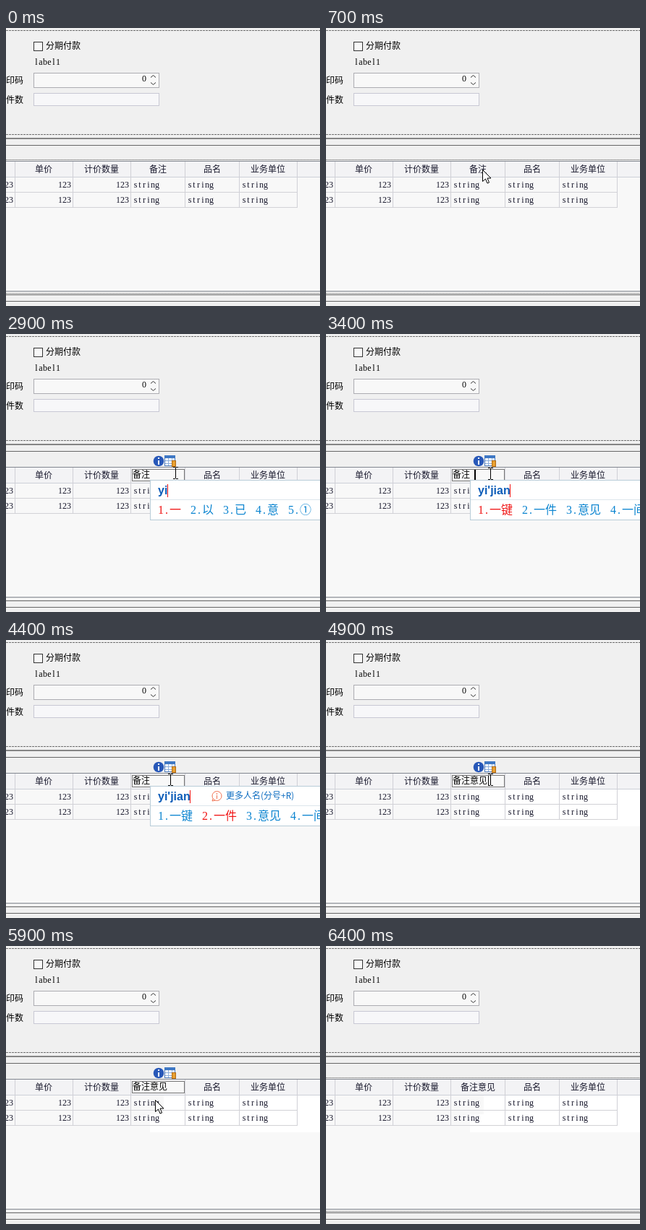
An HTML page with a canvas for the animation above (7100 ms loop, 434 by 385 pixels).

```html
<!DOCTYPE html>
<html lang="zh">
<head>
<meta charset="utf-8">
<style>
html, body { margin: 0; width: 100%; height: 100%; overflow: hidden; background: #f0f0f0; }
canvas { display: block; }
</style>
</head>
<body>
<canvas id="stage" width="434" height="385"></canvas>
<script>
const g = document.getElementById('stage').getContext('2d');
const LOOP = 7100;
const CJK = '"Noto Sans CJK SC", "Noto Sans CJK", sans-serif';
const HAN = '12px ' + CJK;
const INK = '#18182c', BLUE = '#0a84d0', RED = '#f01414', EDGE = '#828790';

// Rows are [start, ...values]; returns the row in force at t.
const at = (rows, t) => rows.filter(r => r[0] <= t).pop();
const within = (t, a, b) => t >= a && t < b;

function box(x, y, w, h, fill, stroke) {
  g.fillStyle = fill;
  g.fillRect(x, y, w, h);
  if (stroke) {
    g.strokeStyle = stroke;
    g.lineWidth = 1;
    g.strokeRect(x + .5, y + .5, w - 1, h - 1);
  }
}

function text(s, x, y, font = HAN, color = INK, align = 'left') {
  g.font = font;
  g.fillStyle = color;
  g.textAlign = align;
  g.fillText(s, x, y);
}

// Half-width Latin: every character sits in a cell half an em wide.
function latin(s, x, y, color = INK, size = 12) {
  const font = size + 'px "Liberation Serif", serif';
  [...s].forEach((c, i) => text(c, x + (i + .5) * size / 2, y, font, color, 'center'));
}

function dots(y, color, on = 1, off = 1) {
  g.fillStyle = color;
  for (let x = 0; x < 434; x += on + off) g.fillRect(x, y, on, 1);
}

function line(points, color, width = 1) {
  g.beginPath();
  points.forEach(([x, y]) => g.lineTo(x, y));
  g.strokeStyle = color;
  g.lineWidth = width;
  g.stroke();
}

function form() {
  box(0, 0, 434, 385, '#f0f0f0');
  dots(3, '#707070', 3, 1);
  box(38, 19, 13, 13, '#f8f8f8', '#333');
  text('分期付款', 55, 29, HAN, '#000');
  latin('label1', 39, 51, '#000');
  text('印码', 0, 77, HAN, '#000');
  text('件数', 0, 104, HAN, '#000');
  box(38, 62, 174, 21, '#f8f8f8', '#adadb2');
  latin('0', 188, 74, '#000');
  line([[200, 68.5], [203.5, 65.5], [207, 68.5]], '#333');
  line([[200, 75.5], [203.5, 78.5], [207, 75.5]], '#333');
  box(38, 90, 174, 18, '#f7f7f9', '#c8c8d4');
  dots(147, '#707070', 3, 1);
  box(0, 152, 434, 2, '#858585');
  box(0, 162, 434, 1, '#666');
}

function table(t) {
  box(0, 185, 434, 179, '#f8f8f8');
  box(0, 185, 434, 22, '#f3f3f5');
  box(0, 184, 434, 1, EDGE);
  if (t >= 4800) {
    box(199, 207, 235, 51, '#fff');
    if (t >= 5900) box(199, 207, 19, 26, '#f8f8f8');
  }
  box(0, 206, 434, 1, '#cdd0d8');
  for (const y of [227, 248]) box(0, y, 403, 1, '#d2d2d6');
  for (const x of [12, 92, 172, 247, 322, 402]) box(x, 185, 1, 64, '#d0d0d6');
  [['单价', 52], ['计价数量', 132], ['品名', 285], ['业务单位', 362]]
    .forEach(([s, x]) => text(s, x, 200, HAN, INK, 'center'));
  if (!within(t, 1400, 6200)) text(t < 1400 ? '备注' : '备注意见', 210, 200, HAN, INK, 'center');
  for (const y of [221, 242]) {
    for (const x of [-8, 72, 152]) latin('123', x, y);
    for (const x of [176, 251, 326]) latin('string', x, y);
  }
  box(0, 364, 434, 1, EDGE);
  box(0, 369, 434, 1, '#666');
  box(0, 378, 434, 1, '#666');
  if (!within(t, 1100, 6400)) {
    dots(182, '#555');
    dots(367, '#555');
  }
}

function icons() {
  g.fillStyle = '#2858b8';
  g.beginPath();
  g.arc(211, 176, 7.3, 0, 7);
  g.fill();
  box(210, 171, 2, 2, '#fff');
  box(210, 175, 2, 6, '#fff');
  box(219, 168, 15, 15, '#fff', '#4a78b8');
  box(219, 168, 15, 4, '#3f78c4');
  for (const y of [175, 179]) box(220, y, 13, 1, '#8fb0dc');
  for (const x of [224, 229]) box(x, 172, 1, 10, '#8fb0dc');
  box(229, 175, 6, 9, '#e8a030', '#b06a18');
}

function editor(t) {
  box(174, 187, 73, 17, '#f8f8f8', '#777');
  const selected = t < 1800;
  if (selected) box(175, 188, 25, 12, '#0078d7');
  text(t < 4800 ? '备注' : '备注意见', 175, 199, HAN, selected ? '#fff' : '#000');
  if (within(t, 1800, 2200)) box(199, 188, 1, 12, '#000');
  if (within(t, 3200, 3900) || within(t, 4500, 4800)) box(205, 188, 2, 14, '#000');
  if (within(t, 4800, 5700)) box(224, 188, 1, 14, '#000');
}

const typing = [
  [2900, 'yi', '一 以 已 意 ①'],
  [3100, "yi'j", '一家 一进 一句 一间'],
  [3200, "yi'ji", '一级 以及 一季 一集'],
  [3300, "yi'jia", '一家 一加 一价 以家'],
  [3400, "yi'jian", '一键 一件 意见 一间']
];

function popup(t) {
  const [, typed, words] = at(typing, t);
  const pick = t < 3900 ? 0 : t < 4500 ? 1 : 2;
  box(199, 202, 240, 56, '#fff', '#b8ccd8');
  box(200, 229, 234, 1, '#dde6ec');
  text(typed, 210, 222, 'bold 16px "Liberation Sans", sans-serif', '#0c5cb8');
  box(Math.floor(210 + g.measureText(typed).width), 208, 1, 18, RED);

  let x = 210;
  words.split(' ').forEach((word, i) => {
    const color = i === pick ? RED : BLUE;
    latin(i + 1 + '.', x, 249, color, 16);
    text(word, x + 16, 249, '16px ' + CJK, color);
    x += 29 + 16 * word.length;
  });

  if (t >= 4000) {
    g.globalAlpha = Math.min(1, (Math.floor(t / 100) - 39) / 4);
    g.strokeStyle = '#f07050';
    g.lineWidth = 1;
    g.beginPath();
    g.arc(291.5, 216, 6.5, 0, 7);
    g.stroke();
    line([[286, 220], [285, 223], [289, 222]], '#f07050');
    box(291, 212, 1, 2, '#f07050');
    box(291, 215, 1, 5, '#f07050');
    text('更多人名(分号+R)', 304, 220, HAN, '#0c6cc0');
    g.globalAlpha = 1;
  }
}

function arrow(x, y) {
  g.beginPath();
  [[0, 0], [0, 16], [4, 12.5], [6.5, 18.5], [9, 17.5], [6.5, 11.5], [11.5, 11.5]]
    .forEach(([dx, dy]) => g.lineTo(x + dx + .5, y + dy + .5));
  g.closePath();
  g.fillStyle = '#fff';
  g.fill();
  g.strokeStyle = '#000';
  g.lineWidth = 1;
  g.stroke();
}

function beam(x, y) {
  box(x, y - 7, 1, 15, '#000');
  for (const dy of [-8, 8]) {
    box(x - 3, y + dy, 3, 1, '#000');
    box(x + 1, y + dy, 3, 1, '#000');
  }
}

const pointer = [
  [0],
  [100, arrow, 305, 104], [200, arrow, 262, 136], [300, arrow, 220, 170],
  [400, arrow, 193, 190], [500, arrow, 215, 195], [700, arrow, 216, 196],
  [1200, arrow, 216, 194],
  [1400, beam, 218, 195], [2200, beam, 226, 193], [2300, beam, 234, 192],
  [3100, beam, 230, 192], [3200, beam, 227, 193],
  [5200, arrow, 222, 190], [5300, arrow, 208, 187], [5400, arrow, 195, 185],
  [5500, arrow, 190, 176], [5600, arrow, 187, 171], [5700, arrow, 190, 190],
  [5800, arrow, 199, 205], [5900, arrow, 206, 213],
  [6000, arrow, 235, 210], [6100, arrow, 264, 206], [6200]
];

function draw(t) {
  form();
  table(t);
  if (within(t, 1400, 6200)) {
    icons();
    editor(t);
  }
  if (within(t, 2900, 4800)) popup(t);
  const [, shape, x, y] = at(pointer, t);
  if (shape) shape(x, y);
}

const start = performance.now();
function frame() {
  draw((performance.now() - start) % LOOP);
  requestAnimationFrame(frame);
}
frame();
</script>
</body>
</html>
```
